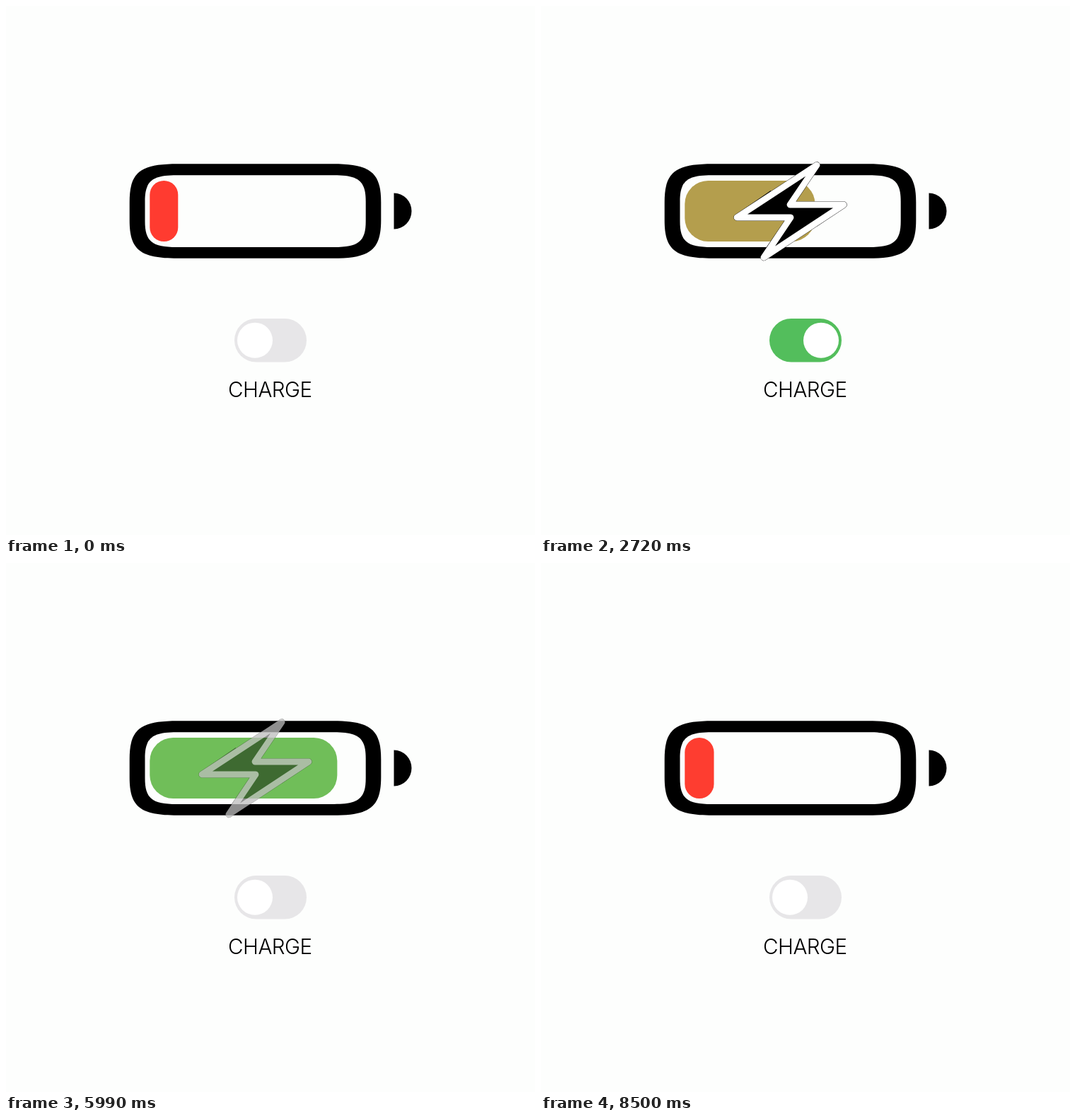
An HTML page for the animation above (8.52 s loop, 748 px wide and 748 px high).

```html
<!DOCTYPE html>
<html lang="en">
<head>
<meta charset="utf-8">
<title>Battery charge</title>
<style>
  html, body { margin: 0; width: 100%; height: 100%; overflow: hidden; background: #fdfefd; }
  svg { display: block; width: 100vw; height: 100vh; }
  text { font: 300 29.6px Inter, Roboto, sans-serif; letter-spacing: -0.55px; }
</style>
</head>
<body>
<svg viewBox="0 0 748 748">
  <path id="shell" fill-rule="evenodd"/>
  <path d="M548.5 264.5A25 25.5 0 0 1 548.5 315.5Z"/>
  <rect id="level" x="203.3" y="247" height="86"/>
  <g id="boltBody" stroke="#000" stroke-linejoin="round">
    <path class="bolt" stroke-width="9.5"/>
    <path d="M273 297.5L325 261.5M432 282.5L390 311M311.5 352L345 305" stroke-width="1.1"/>
  </g>
  <path id="boltRim" class="bolt" fill="none" stroke="#fff" stroke-width="8.8" stroke-linejoin="round"/>
  <rect id="track" x="323" y="442" width="102" height="61.5" rx="30.75"/>
  <circle id="knob" cy="472.7" r="25" fill="#fff"/>
  <text x="373.3" y="552.7" text-anchor="middle">CHARGE</text>
</svg>
<script>
const LOOP = 8520, CHARGE_AT = 1600, DRAIN_AT = 5750;
const LEVEL_MS = 2900, BOLT_MS = 450, TOGGLE_MS = 150;
const EMPTY = [255, 59, 48], FULL = [55, 202, 93];
const OFF = [231, 230, 232], ON = [83, 190, 92];

const $ = id => document.getElementById(id);
const clamp = v => Math.min(1, Math.max(0, v));
const mix = (a, b, p) => a + (b - a) * p;

// Cubic Bézier easing with control points (x1, 0) and (x2, 1).
const bezier = (x1, x2) => x => {
  let lo = 0, hi = 1;
  for (let i = 0; i < 24; i++) {
    const s = (lo + hi) / 2, r = 1 - s;
    if (3 * x1 * s * r * r + 3 * x2 * s * s * r + s ** 3 < x) lo = s; else hi = s;
  }
  return lo * lo * (3 - 2 * lo);
};
const easeOut = bezier(0, 0.58), easeInOut = bezier(0.42, 0.58);

// Gamma 1 mixes plainly; 2.2 mixes in linear light.
const mixColor = (a, b, p, gamma = 1) => `rgb(${a.map((v, i) =>
  Math.round(mix(v ** gamma, b[i] ** gamma, p) ** (1 / gamma)))})`;

// Rounded box whose corners are single curves of extent rx by ry.
function softBox(l, t, r, b, rx, ry, k = 0.78) {
  const cx = rx * (1 - k), cy = ry * (1 - k);
  return `M${l + rx} ${t}H${r - rx}C${r - cx} ${t} ${r} ${t + cy} ${r} ${t + ry}` +
    `V${b - ry}C${r} ${b - cy} ${r - cx} ${b} ${r - rx} ${b}` +
    `H${l + rx}C${l + cx} ${b} ${l} ${b - cy} ${l} ${b - ry}` +
    `V${t + ry}C${l} ${t + cy} ${l + cx} ${t} ${l + rx} ${t}Z`;
}

$('shell').setAttribute('d',
  softBox(174.7, 223.3, 530.3, 356.8, 68, 54) + softBox(196.5, 239.3, 508.7, 341, 45, 37));
for (const path of document.querySelectorAll('.bolt'))
  path.setAttribute('d', 'M390 225L352 281H428L315 355.5L353 299H277Z');

function set(id, attrs) {
  for (const name in attrs) $(id).setAttribute(name, attrs[name]);
}

function draw(t) {
  const state = (ms, ease) => t < DRAIN_AT
    ? ease(clamp((t - CHARGE_AT) / ms))
    : 1 - ease(clamp((t - DRAIN_AT) / ms));
  const level = state(LEVEL_MS, easeOut), toggle = state(TOGGLE_MS, easeInOut);
  const bolt = state(BOLT_MS, easeInOut), width = mix(40, 300, level);
  set('level', { width, rx: Math.min(33, width / 2), fill: mixColor(EMPTY, FULL, level, 2.2) });
  set('boltBody', { opacity: bolt });
  set('boltRim', { opacity: bolt ** 0.7 });
  set('track', { fill: mixColor(OFF, ON, toggle) });
  set('knob', { cx: mix(352, 396, toggle) });
}

function tick() {
  draw(performance.now() % LOOP);
  requestAnimationFrame(tick);
}
tick();
</script>
</body>
</html>
```
